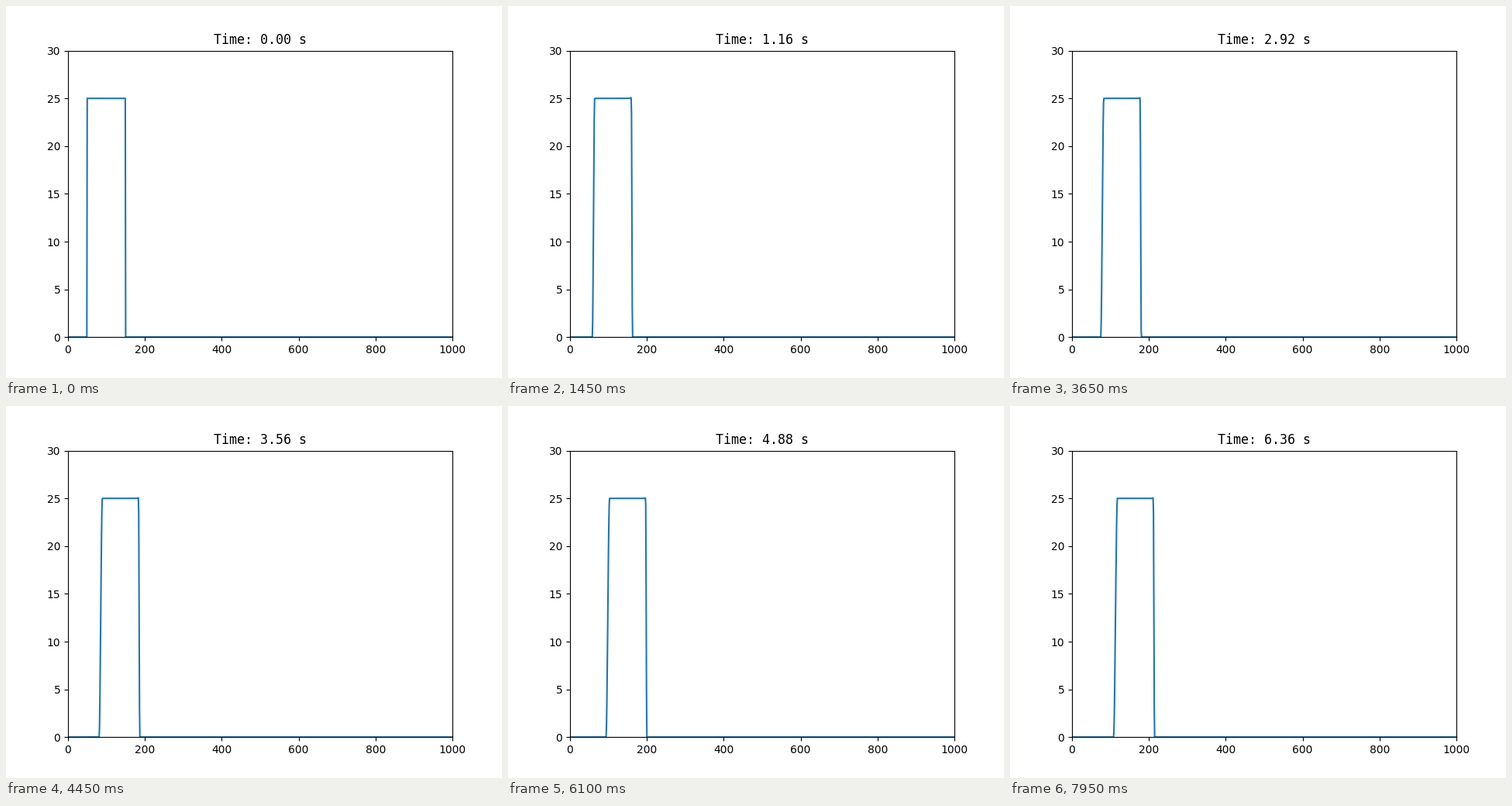
Recreate the animation shown at these times as a matplotlib script. Size 640 by 480 pixels, loop 8 s.

```python
import numpy as np
import matplotlib.pyplot as plt
from matplotlib.animation import FuncAnimation

FRAMES, INTERVAL = 160, 50
DT = 0.04        # simulated seconds per frame
SPEED = 10.0     # cells per second
HEIGHT = 25.0

x = np.arange(1001)


def ramp(center, width):
    """Smooth step from 0 to 1 across the given width."""
    s = np.clip((x - center) / width + 0.5, 0, 1)
    return s * s * (3 - 2 * s)


def pulse(t):
    """Square pulse carried right; its rear edge smears, its front stays steep."""
    rear = 49.5 + SPEED * t
    front = 149.5 + SPEED * t
    rear_width = 1 + 4.8 * t ** (1 / 3)
    front_width = 1 + 2.2 * min(1, t / 0.2)
    u = HEIGHT * ramp(rear, rear_width) * (1 - ramp(front, front_width))
    # slight overshoot just behind the front
    bump = 0.09 * min(1, t / 0.4) * np.exp(-t / 8)
    return u + bump * np.exp(-((x - front + 2.5) / 1.5) ** 2) * (x < front - 1)


fig, ax = plt.subplots(figsize=(6.4, 4.8), dpi=100)
ax.set_xlim(0, 1000)
ax.set_ylim(0, 30)
line, = ax.plot(x, pulse(0))
title = ax.set_title("Time: 0.00 s", family="DejaVu Sans Mono")


def update(i):
    t = i * DT
    line.set_ydata(pulse(t))
    title.set_text(f"Time: {t:.2f} s")
    return line, title


anim = FuncAnimation(fig, update, frames=FRAMES, interval=INTERVAL,
                     repeat=True, repeat_delay=0, blit=False)
plt.show()
```
